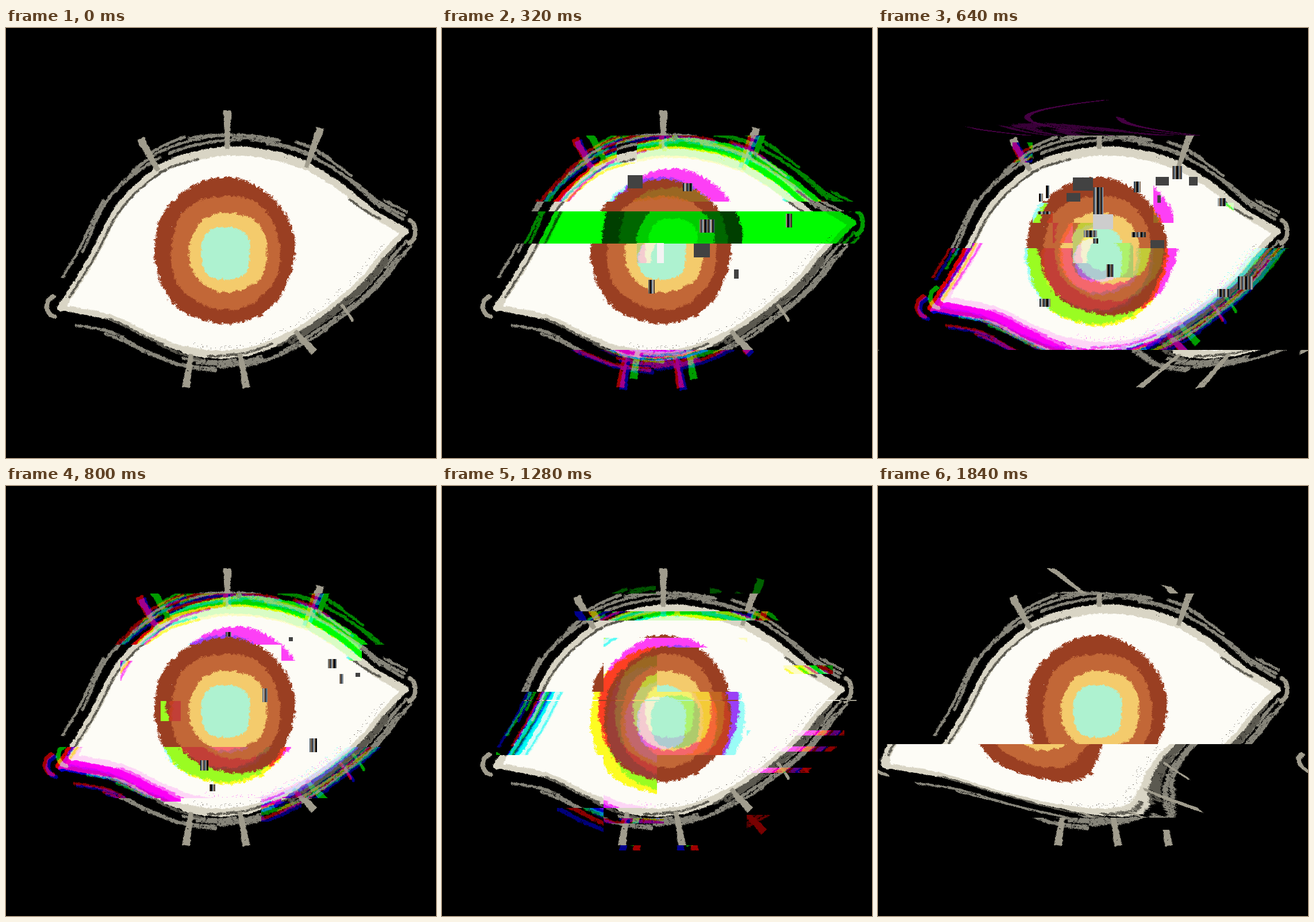
An HTML page with a canvas for the animation above (1920 ms loop, 748 by 748 pixels).

```html
<!DOCTYPE html>
<html lang="en">
<head>
<meta charset="utf-8">
<title>Glitching eye</title>
<style>
  html, body { margin: 0; width: 100%; height: 100%; overflow: hidden; background: #000; }
  canvas { display: block; width: 100vw; height: 100vh; }
</style>
</head>
<body>
<canvas id="stage" width="748" height="748"></canvas>
<script>
const W = 748, STEP = 80, LOOP = 1920;
const ctx = document.getElementById('stage').getContext('2d');

// ---------- noise ----------
function hash(x, y, s) {
  let n = Math.imul(x, 374761393) + Math.imul(y, 668265263) + Math.imul(s, 974634777) | 0;
  n = Math.imul(n ^ (n >>> 13), 1274126177);
  n = Math.imul(n ^ (n >>> 15), 2246822519);
  return ((n ^ (n >>> 16)) >>> 0) / 4294967296;
}
function noise(x, y, s) {
  const i = Math.floor(x), j = Math.floor(y), u = x - i, v = y - j;
  const a = hash(i, j, s), b = hash(i + 1, j, s);
  const c = hash(i, j + 1, s), d = hash(i + 1, j + 1, s);
  return a + (b - a) * u + (c - a) * v + (a - b - c + d) * u * v;
}

// ---------- chalk drawing ----------
function layer() {
  const c = document.createElement('canvas');
  c.width = c.height = W;
  return c.getContext('2d', { willReadFrequently: true });
}
const art = layer();
art.fillStyle = '#000';
art.fillRect(0, 0, W, W);

// Draws on a layer, then roughens its edges and knocks grain out of it.
function chalk(rough, gap, seed, draw) {
  const g = layer();
  g.lineCap = g.lineJoin = 'round';
  draw(g);
  const src = g.getImageData(0, 0, W, W), res = g.createImageData(W, W);
  const from = new Uint32Array(src.data.buffer), to = new Uint32Array(res.data.buffer);
  const shift = (x, y, s) =>
    Math.round(((noise(x / 4, y / 4, s) - .5) * 1.3 + (hash(x, y, s + 1) - .5) * .7) * rough);
  for (let y = 60; y < 690; y++) for (let x = 30; x < 730; x++) {
    const p = from[(y + shift(x, y, seed)) * W + x + shift(x, y, seed + 2)], k = y * W + x;
    if (!p) continue;
    to[k] = p;
    const grain = noise(x / 4, y / 4, seed + 4) * .6 + hash(x, y, seed + 5) * .4;
    if (grain < gap) res.data[k * 4 + 3] *= .25;
  }
  g.putImageData(res, 0, 0);
  art.drawImage(g.canvas, 0, 0);
}

// Lids run from the left corner to the right one; side is the outward direction.
const UPPER = { side: 1, keys: [[96, 487], [150, 400], [197, 312], [262, 250], [320, 225], [385, 214],
  [452, 219], [520, 239], [585, 279], [640, 323], [694, 354]] };
const LOWER = { side: -1, keys: [[96, 487], [180, 503], [250, 536], [312, 560], [370, 568], [430, 561],
  [490, 536], [560, 490], [620, 438], [660, 390], [694, 354]] };

function spot({ keys }, t) {
  const n = keys.length - 1, i = Math.min(n - 1, Math.floor(t * n)), u = t * n - i;
  const key = k => keys[Math.max(0, Math.min(n, k))];
  return [0, 1].map(c => {
    const [p, q, r, s] = [i - 1, i, i + 1, i + 2].map(k => key(k)[c]);
    return q + u / 2 * (r - p + u * (2 * p - 5 * q + 4 * r - s + u * (3 * (q - r) + s - p)));
  });
}
function offset(lid, t, d) {
  const [x, y] = spot(lid, t), [a, b] = spot(lid, Math.max(0, t - .01)), [c, e] = spot(lid, Math.min(1, t + .01));
  const k = d * lid.side / Math.hypot(c - a, e - b);
  return [x + (e - b) * k, y - (c - a) * k];
}
// Line that follows a lid from t0 to t1, drifting from distance d0 to d1.
function trace(g, lid, t0, t1, d0, d1, width, color) {
  g.beginPath();
  for (let i = 0; i <= 30; i++) g.lineTo(...offset(lid, t0 + (t1 - t0) * i / 30, d0 + (d1 - d0) * i / 30));
  g.lineWidth = width;
  g.strokeStyle = color;
  g.stroke();
}
// Loose seeded strokes beside a lid.
function sketch(g, lid, count, near, far, width, color, seed) {
  for (let i = 0; i < count; i++) {
    const r = k => hash(i, k, seed);
    const t = .04 + .9 * (i + r(1) * .6) / count, d = near + (far - near) * r(2);
    trace(g, lid, t, Math.min(.97, t + .08 + .14 * r(3)), d, d + 10 * (r(4) - .5), width, color);
  }
}

function lash(g, [x1, y1, x2, y2], tip, root) {
  const len = Math.hypot(x2 - x1, y2 - y1), nx = (y1 - y2) / len / 2, ny = (x2 - x1) / len / 2;
  g.beginPath();
  g.moveTo(x1 + nx * tip, y1 + ny * tip);
  g.lineTo(x2 + nx * root, y2 + ny * root);
  g.lineTo(x2 - nx * root, y2 - ny * root);
  g.lineTo(x1 - nx * tip, y1 - ny * tip);
  g.fill();
}
// Wobbly rounded disc; power 2 is an ellipse, higher is squarer.
function disc(g, x, y, rx, ry, power, color) {
  const f = v => Math.sign(v) * Math.abs(v) ** (2 / power);
  g.beginPath();
  for (let i = 0; i < 120; i++) {
    const a = i / 60 * Math.PI, r = 1 + .012 * Math.sin(a * 5 + rx);
    g.lineTo(x + rx * r * f(Math.cos(a)), y + ry * r * f(Math.sin(a)));
  }
  g.fillStyle = color;
  g.fill();
}

const LID = '#d9d5c5', GREY = '#a09c8d', DIM = '#87857a', DARK = '#5b5950';
const LASHES = [[234, 192, 264, 248], [385, 143, 385, 210], [547, 174, 522, 243], [313, 625, 322, 568],
  [418, 626, 407, 566], [536, 564, 502, 527], [604, 510, 584, 481]];

function paintEye() {
  chalk(2, .24, 3, g => {
    sketch(g, UPPER, 18, 16, 34, 5, DIM, 5);
    sketch(g, LOWER, 18, 12, 30, 5, DIM, 8);
  });
  chalk(1, 0, 11, g => {
    g.beginPath();
    for (let i = 0; i <= 60; i++) g.lineTo(...spot(UPPER, i / 60));
    for (let i = 60; i >= 0; i--) g.lineTo(...spot(LOWER, i / 60));
    g.fillStyle = '#fdfcf6';
    g.fill();
  });
  chalk(2, .08, 21, g => {
    trace(g, UPPER, 0, 1, 0, 0, 13, LID);
    trace(g, UPPER, .3, .7, 0, 0, 16, LID);
    trace(g, LOWER, 0, 1, 0, 0, 10, LID);
    trace(g, LOWER, .3, .6, 0, 0, 14, LID);
  });
  chalk(2, .24, 31, g => {
    trace(g, LOWER, .6, .88, 9, 9, 12, DARK);
    trace(g, UPPER, .03, .42, -2, -7, 4, DARK);
    trace(g, UPPER, .83, .92, -8, -2, 4, DARK);
    sketch(g, LOWER, 7, 2, 8, 4, DARK, 12);
  });
  chalk(1.5, .1, 41, g => {
    g.fillStyle = g.strokeStyle = GREY;
    LASHES.forEach((p, i) => i < 6 ? lash(g, p, 14, 8) : lash(g, p, 5, 5));
    g.lineWidth = 8;
    g.beginPath();
    g.ellipse(87, 484, 16, 18, 0, 1.7, 4.4);
    g.stroke();
    g.beginPath();
    g.ellipse(699, 354, 13, 20, 0, -1.3, 1.4);
    g.stroke();
  });
  chalk(5, .02, 51, g => disc(g, 380, 388, 122, 127, 2.05, '#9a3f22'));
  chalk(4, 0, 61, g => disc(g, 382, 390, 95, 99, 2.2, '#c26737'));
  chalk(4, 0, 71, g => disc(g, 387, 390, 68, 69, 2.2, '#f4cb6c'));
  chalk(3, 0, 81, g => disc(g, 382, 392, 42, 45, 2.9, '#aef2d0'));
  // Stray specks inside the lower lid.
  art.fillStyle = '#77736a';
  for (let i = 0; i < 120; i++) {
    const [x, y] = offset(LOWER, .3 + hash(i, 1, 5) * .62, -8 - hash(i, 2, 5) * 8);
    art.fillRect(x | 0, y | 0, 1, 1);
  }
}
paintEye();
const base = art.getImageData(0, 0, W, W);

// ---------- glitch tools ----------
// Channel offsets: red x, y, green x, y, blue x, y.
const NONE = [0, 0, 0, 0, 0, 0];
const LIFT = [-3, 0, 20, -15, 2, 4];
const DROP = [24, 18, 14, 0, 0, 20];
const SMEAR = [40, 0, 0, 0, 24, 0];
const FULL = [1, 1, 1], GREEN = [0, 1, 0], DIM_GREEN = [0, .62, 0], RED = [.75, 0, 0], PURPLE = [.42, 0, .46];
let out;

function warp(x, y, w, h, off, gain = FULL, dx = () => 0, dy = 0) {
  for (let j = y; j < y + h; j++) {
    const slide = Math.round(dx(j));
    for (let i = x; i < x + w; i++) for (let c = 0; c < 3; c++) {
      const sx = (i - off[2 * c] - slide + 2 * W) % W, sy = j - off[2 * c + 1] - dy;
      out.data[(j * W + i) * 4 + c] = base.data[(sy * W + sx) * 4 + c] * gain[c];
    }
  }
}
const rows = (y, h, off, gain, dx, dy) => warp(0, y, W, h, off, gain, dx, dy);
const slide = (y, h, dx) => rows(y, h, NONE, FULL, dx);

function fill(x, y, w, h, shade) {
  for (let j = y; j < y + h; j++) for (let i = x; i < x + w; i++) for (let c = 0; c < 3; c++)
    out.data[(j * W + i) * 4 + c] = shade(i - x, c);
}
const grey = (x, y, w, h, v = 66) => fill(x, y, w, h, () => v);
const barcode = (x, y, w, h) => fill(x, y, w, h, (i, c) =>
  82 + 62 * Math.sin(i * .95 + x + c * .35) + 40 * Math.sin(i * .42 + y));

// Small seeded blocks over the eye.
function debris(seed, count) {
  for (let i = 0; i < count; i++) {
    const r = k => hash(i, k, seed);
    (r(5) < .75 ? barcode : grey)(270 + r(1) * 360 | 0, 240 + r(2) * 280 | 0, 6 + r(3) * 24 | 0, 5 + r(4) * 20 | 0);
  }
}
// Seeded cells of a 35 px grid.
function tiles(seed, density, off) {
  for (let x = 164; x < 600; x += 35) for (let y = 199; y < 560; y += 35)
    if (hash(x, y, seed) < density) warp(x, y, 35, 35, off);
}

// ---------- glitch poses ----------
const clean = () => {};

function flash() {
  rows(187, 115, LIFT);
  rows(319, 56, LIFT, GREEN);
  rows(560, 72, LIFT);
  warp(304, 199, 35, 35, NONE);
  warp(339, 374, 35, 35, DROP);
  grey(374, 374, 12, 35, 243);
  debris(3, 7);
}

function shatter() {
  rows(124, 63, NONE, PURPLE, y => -125 + 135 * ((y - 155) / 30) ** 2, -18);
  rows(383, 177, LIFT);
  slide(560, 72, y => 205 - (y - 565) * 1.05);
  tiles(4, .1, LIFT);
  warp(479, 269, 35, 70, LIFT);
  warp(339, 339, 35, 70, DROP);
  warp(409, 374, 35, 60, DROP);
  grey(339, 260, 35, 23);
  barcode(374, 277, 18, 47);
  grey(374, 324, 35, 26, 205);
  debris(7, 18);
}

function tear() {
  warp(290, 160, 82, 27, [0, 0, 10, -10, 0, 0], DIM_GREEN);
  warp(466, 155, 95, 32, [0, 0, 8, -12, 0, 0], DIM_GREEN);
  rows(218, 16, DROP);
  warp(281, 264, 93, 296, DROP);
  warp(281, 264, 250, 17, DROP);
  warp(570, 312, 110, 15, DROP);
  warp(94, 358, 436, 110, DROP);
  slide(372, 2, () => 12);
  for (const y of [425, 453, 490]) warp(530, y, 170, 9, SMEAR);
  warp(200, 560, 81, 50, DROP);
  warp(281, 578, 105, 9, LIFT);
  warp(530, 572, 70, 36, DROP, RED, () => 0, 20);
  rows(625, 9, DROP);
}

function bend() {
  slide(120, 67, y => -84 + (y - 143) * 1.3);
  slide(449, 128, y => -95 + 145 * ((y - 450) / 125) ** 2);
  warp(470, 598, 60, 30, NONE, FULL, () => 88);
}

function lean() {
  slide(139, 48, y => -40 + (y - 143) * .8);
  slide(449, 128, y => -50 + 80 * ((y - 450) / 125) ** 2);
}
const sway = () => slide(449, 128, y => 40 * Math.sin((y - 449) / 40));

// Seeded bursts: split bands with blocks, or thin torn bands.
const burst = (seed, power, push = 0) => () => {
  for (let y = 187; y < 632; y += 89) if (hash(y, 1, seed) < power) rows(y, 89, LIFT);
  if (push) slide(560, 72, y => push - (y - 565));
  tiles(seed, power * .15, LIFT);
  debris(seed, power * 24 | 0);
};
const nick = (seed, power) => () => {
  for (let y = 218; y < 640; y += 47) if (hash(y, 1, seed) < power) rows(y, 14, DROP);
  const x = 281 + 93 * (seed % 2);
  warp(x, 358, 93, 110, DROP);
};

// One pose per step; repeats are holds.
const rest = burst(23, .25);
const timeline = [
  clean, clean, burst(2, .3), burst(4, .4), flash, flash,
  burst(6, .4), burst(8, .5, 90), shatter, burst(10, .5, -120), burst(12, .4), burst(14, .3),
  rest, rest, clean, nick(1, .3), tear, nick(2, .4), nick(3, .2), clean,
  sway, sway, lean, bend
];

const cache = new Map();
function render(pose) {
  out = new ImageData(new Uint8ClampedArray(base.data), W, W);
  pose();
  cache.set(pose, out);
}
new Set(timeline).forEach(render);

let shown, start;
function tick(now) {
  start ??= now;
  const pose = timeline[Math.floor((now - start) % LOOP / STEP)];
  if (pose !== shown) ctx.putImageData(cache.get(shown = pose), 0, 0);
  requestAnimationFrame(tick);
}
ctx.putImageData(base, 0, 0);
requestAnimationFrame(tick);
</script>
</body>
</html>
```
